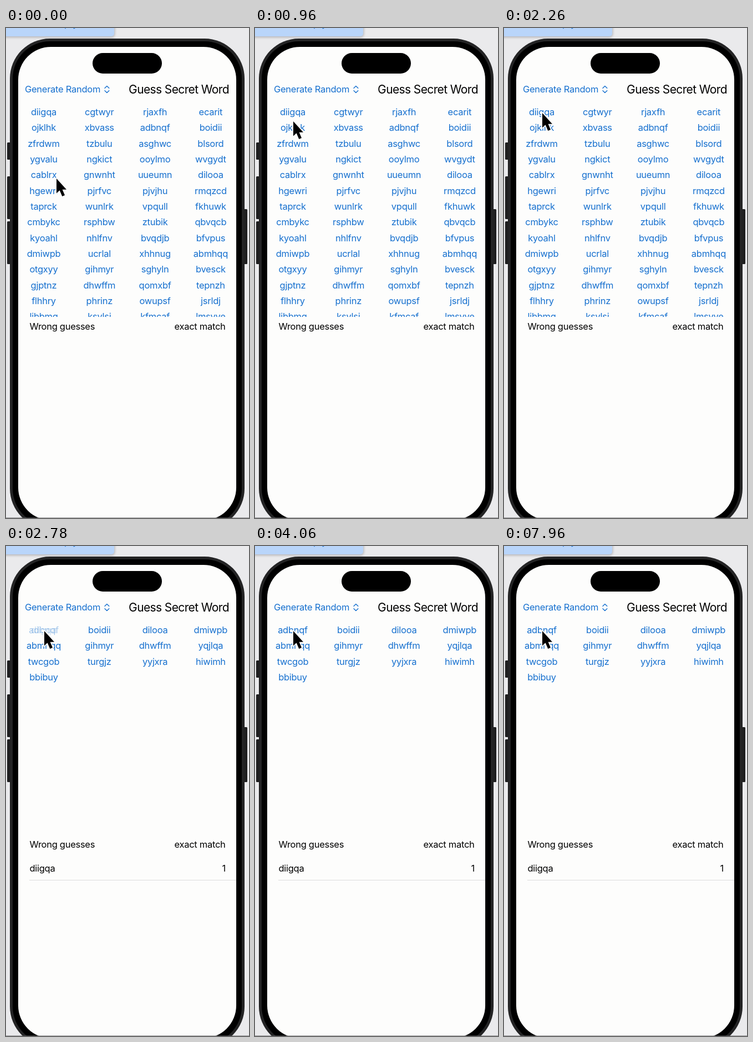
These frames come from a looping animation (438 by 882 pixels, 8000 ms). An HTML page:

```html
<!DOCTYPE html>
<html lang="en">
<head>
<meta charset="utf-8">
<title>Guess Secret Word</title>
<style>
  html, body { margin: 0; width: 100%; height: 100%; overflow: hidden; background: #eaeaec; }
  svg { display: block; width: 438px; height: 882px; }
  text { font: 16.5px Inter, "Liberation Sans", sans-serif; font-optical-sizing: none; letter-spacing: -.28px; }
  .title { font-size: 21px; letter-spacing: -.62px; }
  .blue { fill: #1670cf; }
  .mid { text-anchor: middle; }
  .end { text-anchor: end; }
  .before, .after, .leaving, .arriving, .pointer { animation: 8s infinite; }
  .before { animation-name: before; animation-timing-function: step-end; }
  .after { animation-name: after; animation-timing-function: step-end; }
  .leaving { animation-name: leaving; animation-timing-function: linear; }
  .arriving { animation-name: arriving; animation-timing-function: linear; }
  .pointer { animation-name: point; animation-timing-function: ease-in-out; }
  @keyframes before { 0% { opacity: 1 } 30%, 100% { opacity: 0 } }
  @keyframes after { 0% { opacity: 0 } 30%, 100% { opacity: 1 } }
  @keyframes leaving {
    0%, 29.49% { opacity: 1 }
    29.5%, 31% { opacity: .3 }
    34.75% { opacity: .22 }
    38%, 100% { opacity: 0 }
  }
  @keyframes arriving {
    0%, 29.99% { opacity: 0 }
    30% { opacity: .12 }
    34.75% { opacity: .36 }
    39%, 100% { opacity: 1 }
  }
  @keyframes point {
    0% { transform: translate(91px, 271px) }
    10.25%, 15% { transform: translate(69px, 168px) }
    19.5%, 100% { transform: translate(69px, 153px) }
  }
</style>
</head>
<body>
<svg viewBox="0 0 438 882">
  <defs>
    <clipPath id="list"><rect x="22" y="130" width="393" height="390"/></clipPath>
    <filter id="soft" x="-20%" y="-60%" width="140%" height="240%"><feGaussianBlur stdDeviation="2"/></filter>
  </defs>
  <rect width="438" height="882" fill="#eaeaec"/>

  <rect x="-10" y="-16" width="206" height="33" rx="6" fill="#85858c" opacity=".55" filter="url(#soft)"/>
  <rect x="-10" y="-20" width="205" height="35" rx="5" fill="#b9d5fa"/>
  <text class="blue" x="76" y="-2">(empty)</text>

  <g fill="#1f1f20">
    <rect x="2" y="206" width="7" height="31" rx="1.5"/>
    <rect x="2" y="267" width="7" height="77" rx="1.5"/>
    <rect x="2" y="348" width="7" height="77" rx="1.5"/>
    <rect x="428" y="326" width="7" height="99" rx="1.5"/>
  </g>
  <rect x="7" y="19" width="423" height="882" rx="72" fill="#242425"/>
  <rect x="12" y="24" width="413" height="872" rx="67"/>
  <rect x="22" y="34" width="393" height="852" rx="59" fill="#fdfdfc"/>
  <rect x="156" y="45" width="125" height="37" rx="18.5"/>
  <rect y="881" width="438" height="1" fill="#5c5c5e" opacity=".6"/>

  <text class="blue" x="34" y="116">Generate Random</text>
  <path d="M178 108.3l3.9-3.8 3.9 3.8M178 112.7l3.9 3.8 3.9-3.8" fill="none" stroke="#1670cf" stroke-width="1.4" stroke-linecap="round" stroke-linejoin="round"/>
  <text class="title mid" x="311.5" y="118">Guess Secret Word</text>

  <g clip-path="url(#list)" class="blue mid">
    <g class="before" id="before"></g>
    <g class="after" id="after"></g>
    <text class="leaving" x="68" y="157">diigqa</text>
    <text class="arriving" x="68" y="157">adbnqf</text>
  </g>

  <text x="42.5" y="543">Wrong guesses</text>
  <text class="end" x="395.5" y="543">exact match</text>
  <g class="after">
    <text x="42.5" y="586">diigqa</text>
    <text class="end" x="396" y="586">1</text>
    <rect x="42" y="601" width="373" height="1" fill="#dcdcdd"/>
  </g>

  <g class="pointer">
    <path d="M0 0V26.5L5.7 21.2 10.3 32 15 30 10.6 19.8H18Z" stroke="#fdfdfc" stroke-width="3.6" stroke-linejoin="round" paint-order="stroke"/>
  </g>
</svg>
<script>
  // "-" leaves the first cell to the separately fading words.
  const lists = {
    before: `- cgtwyr rjaxfh ecarit ojklhk xbvass adbnqf boidii
      zfrdwm tzbulu asghwc blsord ygvalu ngkict ooylmo wvgydt
      cablrx gnwnht uueumn dilooa hgewri pjrfvc pjvjhu rmqzcd
      taprck wunlrk vpqull fkhuwk cmbykc rsphbw ztubik qbvqcb
      kyoahl nhlfnv bvqdjb bfvpus dmiwpb ucrlal xhhnug abmhqq
      otgxyy gihmyr sghyln bvesck gjptnz dhwffm qomxbf tepnzh
      flhhry phrinz owupsf jsrldj libbmg ksylsi kfmcaf lmsyve`,
    after: `- boidii dilooa dmiwpb abmhqq gihmyr dhwffm yqjlqa
      twcgob turgjz yyjxra hiwimh bbibuy`
  };

  for (const [id, words] of Object.entries(lists)) {
    words.split(/\s+/).forEach((word, i) => {
      if (word === "-") return;
      const cell = document.createElementNS("http://www.w3.org/2000/svg", "text");
      cell.setAttribute("x", 68 + (i % 4) * 100.3);
      cell.setAttribute("y", 157 + Math.floor(i / 4) * 28.33);
      cell.textContent = word;
      document.getElementById(id).append(cell);
    });
  }
</script>
</body>
</html>
```
